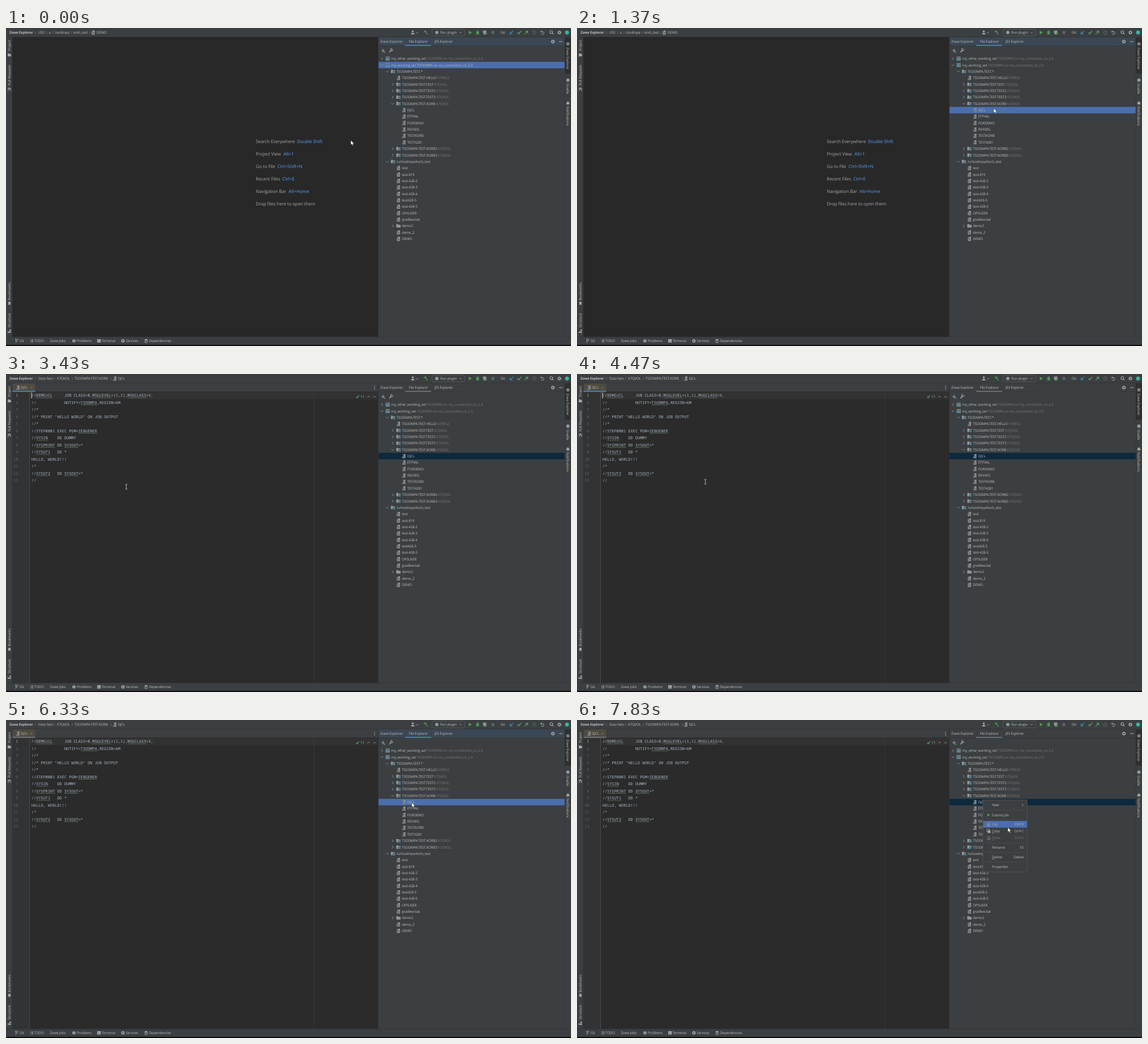
An HTML page for the animation above (8000 ms loop, 998 px wide and 561 px high).

```html
<!DOCTYPE html>
<html lang="en">
<head>
<meta charset="utf-8">
<title>IDE file explorer</title>
<style>
  html, body { margin: 0; width: 100%; height: 100%; overflow: hidden; background: #3c3f41; }
  svg { display: block; width: 998px; height: 561px; }
  text { font: 6.2px "Open Sans", "Noto Sans", sans-serif; letter-spacing: -.16px; fill: #bbb; white-space: pre; text-rendering: geometricPrecision; }
  .bold { font-weight: bold; }
  .big { font-size: 8px; letter-spacing: -.1px; fill: #a5a5a5; }
  .link { fill: #589df6; }
  .dim { fill: #787878; }
  .code { font: 6.9px "Noto Sans Mono", "DejaVu Sans Mono", monospace; letter-spacing: 0; fill: #a9b7c6; }
  .num { fill: #606366; }
  .end { text-anchor: end; }
  .mid { text-anchor: middle; }
</style>
</head>
<body>
<svg id="stage" viewBox="0 0 998 561"></svg>
<script>
const GREY = '#a4a7a9', ICON = '#929597', GREEN = '#499c54', BLUE = '#3a87ad';
const SELECT = '#4b6eaf', FOCUS_LINE = '#4a88c7';
const ROW = 11.357, LINE = 12.5, CHAR = 4.14;

// Drawing helpers; y is the vertical centre of the item.
const text = (x, y, s, cls = '', attrs = '') =>
  `<text x="${x}" y="${y + (cls.includes('big') ? 2.8 : 2.2)}" class="${cls}" ${attrs}>${s}</text>`;
const rect = (x, y, w, h, fill, attrs = '') =>
  `<rect x="${x}" y="${y}" width="${w}" height="${h}" fill="${fill}" ${attrs}/>`;
const path = (x, y, d, stroke = GREY, width = 1, fill = 'none') =>
  `<path transform="translate(${x} ${y})" d="${d}" stroke="${stroke}" stroke-width="${width}" fill="${fill}"/>`;
const solid = (x, y, d, fill = GREY) => path(x, y, d, 'none', 0, fill);
const dot = (x, y, r, fill) => `<circle cx="${x}" cy="${y}" r="${r}" fill="${fill}"/>`;
const ring = (x, y, r, stroke = GREY, width = 1) =>
  `<circle cx="${x}" cy="${y}" r="${r}" fill="none" stroke="${stroke}" stroke-width="${width}"/>`;
const group = (id, body) => `<g id="${id}">${body}</g>`;

const right = (x, y, c = GREY) => path(x, y, 'M-1-2.2L1.2 0L-1 2.2', c, .8);
const down = (x, y, c = GREY) => path(x, y, 'M-2.2-1L0 1.2L2.2-1', c, .8);
const up = (x, y) => path(x, y, 'M-2.2 1L0-1.2L2.2 1', GREY, .8);
const play = (x, y, k = 1) => solid(x, y, `M${-2.5 * k} ${-3.3 * k}L${3 * k} 0L${-2.5 * k} ${3.3 * k}z`, GREEN);
const gear = (x, y) => ring(x, y, 2, GREY, 1.5) +
  `<circle cx="${x}" cy="${y}" r="3.1" fill="none" stroke="${GREY}" stroke-width="1" stroke-dasharray="1.2 1.23"/>`;

const icons = {
  set: (x, y) => rect(x - 3.6, y - 3.4, 7.2, 6.8, '#7d8a92') + rect(x - 3.6, y - 1.7, 7.2, .7, '#3c3f41') +
    rect(x - 2.5, y - .2, 5, 2.4, BLUE),
  folder: (x, y) => solid(x, y, 'M-3.8-3.2H-.8L.3-2H3.8V2.8H-3.8z', ICON),
  source: (x, y) => icons.folder(x, y) + rect(x, y - .2, 4, 3.6, BLUE, 'stroke="#3c3f41" stroke-width=".6"'),
  file: (x, y) => solid(x, y, 'M-.6-3.7H2.8V3.7H-2.8V-1.4H-.6z', ICON) + solid(x, y, 'M-1.3-3.7V-2H-2.8z', ICON) +
    path(x, y, 'M-1.8 0H1.8M-1.8 1.8H1.8', '#45484a', .8),
  member: (x, y) => solid(x, y, 'M-.2-3.7H2.8V3.7H-2.8V1H-1V-1.4H-.2z', ICON) + solid(x, y, 'M-1-3.7V-2H-2.5z', ICON) +
    path(x, y, 'M-3 2.3H1.5M-.3.2H1.8', '#45484a', .8),
};

// [level, chevron, icon, name, suffix]
const tree = [
  [0, '>', 'set', 'my_other_working_set', 'TSODMPA on my_connection_to_2.4'],
  [0, 'v', 'set', 'my_working_set', 'TSODMPA on my_connection_to_2.3'],
  [1, 'v', 'source', 'TSODMPA.TEST.*'],
  [2, '', 'member', 'TSODMPA.TEST.HELLO', 'K7RES2'],
  [2, '>', 'source', 'TSODMPA.TEST.TEST', 'K7QVOL'],
  [2, '>', 'source', 'TSODMPA.TEST.TEST2', 'K7QVOL'],
  [2, '>', 'source', 'TSODMPA.TEST.TEST3', 'K7QVOL'],
  [2, 'v', 'source', 'TSODMPA.TEST.KORB', 'K7QVOL'],
  ...['DJCL', 'ETPVAL', 'FORDEMO', 'REXXEG', 'TESTKORB', 'TEST4281'].map(s => [3, '', 'member', s]),
  [2, '>', 'source', 'TSODMPA.TEST.KORB2', 'K7QVOL'],
  [2, '>', 'source', 'TSODMPA.TEST.KORB3', 'K7QVOL'],
  [1, 'v', 'source', '/u/tsodmpa/korb_test'],
  ...['test', 'test-819', 'test-428-2', 'test-428-3', 'test-428-4', 'test428-5', 'test-428-5', 'OPSUSER', 'gradlew.bat']
    .map(s => [2, '', 'file', s]),
  [2, '>', 'folder', 'demo2'],
  [2, '', 'file', 'demo_2'],
  [2, '', 'file', 'DEMO'],
];
const rowY = i => 54 + i * ROW;
const treeRow = ([level, chevron, icon, name, suffix], i) => {
  const x = 664 + level * 9.5, y = rowY(i);
  const tail = suffix ? `<tspan class="dim" id="suffix${i}"> ${suffix}</tspan>` : '';
  return (chevron === '>' ? right(x, y) : chevron ? down(x, y) : '') +
    icons[icon](x + 10.2, y) + text(x + 16.3, y, name + tail);
};

const code = [
  '//DEMOJCL     JOB CLASS=B,MSGLEVEL=(1,1),MSGCLASS=X,',
  '//            NOTIFY=TSODMPA,REGION=6M',
  '//*',
  '//* PRINT "HELLO WORLD" ON JOB OUTPUT',
  '//*',
  '//STEP0001 EXEC PGM=IEBGENER',
  '//SYSIN    DD DUMMY',
  '//SYSPRINT DD SYSOUT=*',
  '//SYSUT1   DD *',
  'HELLO, WORLD!!!',
  '/*',
  '//SYSUT2   DD SYSOUT=*',
  '//',
];
const codeLine = (s, i) => {
  const y = 38 + i * LINE;
  const typos = [...s.matchAll(/DEMOJCL|MSG\w+|TSODMPA|IEBGENER|SYS\w+/g)]
    .map(m => rect(45 + m.index * CHAR, y + 3.6, m[0].length * CHAR, .7, '#64836a')).join('');
  return text(21.5, y, i + 1, 'code num end', i ? '' : 'style="fill:#a4a3a3"') + text(45, y, s, 'code') + typos;
};

const crumbs = (items, seps) => items.map(([x, s]) => text(x, 8, s)).join('') +
  seps.map(x => right(x, 8, '#777')).join('');

const topBar = () => text(6, 8, 'Zowe Explorer', 'bold') + right(52, 8, '#777') +
  dot(718.5, 6, 1.8, GREY) + solid(718.5, 8, 'M-3.2 3.2Q-3 .6 0 .6T3.2 3.2z') + down(726, 8.2) +
  path(741, 8, 'M-3-1L1-3.5M-.5-2L3.5 3.2', GREEN, 1.5) +
  rect(752.5, 2, 57.5, 12, 'none', 'rx="1.5" stroke="#5e6060" stroke-width=".8"') + dot(761, 8, 3, '#8a9a9c') +
  text(767, 8, 'Run plugin') + down(803, 8) + play(820, 8) +
  `<ellipse cx="833" cy="8.4" rx="2.3" ry="3" fill="${GREEN}"/>` +
  path(833, 8, 'M-3.5-2L3.5 3M3.5-2L-3.5 3M-1.5-4L1.5-2M1.5-4L-1.5-2', GREEN, .7) +
  solid(845.5, 7.5, 'M-3-3H3V1Q2 3.5 0 4Q-3 3-3 0z', ICON) + play(848, 9.8, .75) +
  rect(857.4, 5.4, 5.2, 5.2, '#5f6264') + text(873.5, 8, 'Git:') +
  path(893, 8, 'M2.8-2.8L-2 2M-2.5-1.5V2.5H1.5', '#3592c4', 1.2) +
  path(906.5, 8, 'M-3 0L-1 2.5L3.2-2.7', '#59a869', 1.4) +
  path(919, 8, 'M-2.8 2.8L2 -2M-1.5-2.5H2.5V1.5', '#59a869', 1.2) +
  ring(933, 8, 3.2, '#5f6264') + path(933, 8, 'M0-2V.3H1.8', '#5f6264', .8) +
  path(947, 8, 'M-2.5-1.5H1A2.2 2.2 0 0 1 1 3H-1.5M-.8-3.6L-3-1.5L-.8.6', GREY, 1) +
  ring(963.2, 7.2, 2.4, GREY, 1.1) + path(963.2, 7.2, 'M1.8 1.8L4 4', GREY, 1.2) +
  gear(977.5, 8) + dot(991, 8, 3.4, '#35b8a0');

const bottomBar = () => [[24, 'Git'], [50, 'TODO'], [77.5, 'Zowe Jobs'], [125, 'Problems'], [169, 'Terminal'],
    [211.5, 'Services'], [252.5, 'Dependencies']].map(([x, s]) => text(x, 552, s)).join('') +
  path(19, 552, 'M-1.5-3.5V3.5M-1.5 1Q1.5 1 1.5-1.8', GREY, .9) + dot(17.5, 549, 1, GREY) + dot(20.5, 549.6, 1, GREY) +
  path(45.5, 552, 'M-2.5-2H-1.5M-.7-2H2.8M-2.5 0H-1.5M-.7 0H2.8M-2.5 2H-1.5M-.7 2H2.8', GREY, 1) +
  dot(120, 552, 2.8, GREY) + path(120, 552, 'M0-1.8V.4M0 1.1V1.9', '#3c3f41', .9) +
  rect(161, 549, 6.4, 6, GREY) + path(164, 552, 'M-1.8-1.5L-.3 0L-1.8 1.5M.4 1.6H2.4', '#3c3f41', .7) +
  dot(206.5, 552, 3, GREY) + solid(206.5, 552, 'M-1-1.7L1.8 0L-1 1.7z', '#3c3f41') +
  solid(247.5, 552, 'M0-3.5L3.5-1.8L0 0L-3.5-1.8z') + path(247.5, 552, 'M-3.2.3L0 1.8L3.2.3M-3.2 2L0 3.4L3.2 2', GREY, .8);

const vertical = (x, y, s, angle) => `<g transform="translate(${x} ${y}) rotate(${angle})">${text(0, 0, s)}</g>`;
const stripes = () => [[40.5, 'Project'], [101.5, 'Pull Requests'], [480.5, 'Bookmarks'], [528.5, 'Structure']]
    .map(([y, s]) => vertical(6, y, s, -90)).join('') +
  solid(6, 47.3, 'M-2.8-2.6H-.3L.6-1.6H2.8V2.6H-2.8z') +
  path(6, 108, 'M-2-3V3M2-1V3M2-1.5H-.5M.8-3L-.6-1.5L.8 0', GREY, 1.1) +
  solid(6, 486, 'M-2-3H2V3L0 1.4L-2 3z') +
  rect(3, 535.2, 2.6, 2.6, GREY) + rect(6, 532, 2.6, 2.6, GREY) + rect(6, 535.4, 2.6, 2.6, GREY) +
  rect(987, 16.5, 11, 64, '#2d2f30') + dot(992.5, 28, 3, '#7b7e80') + vertical(992.3, 34, 'Zowe Explorer', 90) +
  dot(992.5, 92, 3, '#8a9a9c') + vertical(992.3, 98, 'Gradle', 90) +
  solid(992.5, 132.5, 'M-3 2V1L-2-1Q-1.6-3 0-3T2-1L3 1V2zM-1 2.5H1L0 3.6z') +
  vertical(992.3, 138, 'Notifications', 90);

const panel = () => rect(657.2, 16, .8, 529, '#2f3133') + rect(658, 16.5, 329, 14.5, '#3b4754', 'id="header"') +
  rect(658, 31, 329, .7, '#323537') + rect(705, 29.8, 46, 1.7, FOCUS_LINE, 'id="headerLine"') +
  text(661, 24, 'Zowe Explorer:') + text(711.5, 24, 'File Explorer') + text(757, 24, 'JES Explorer') +
  gear(966, 24) + path(980, 24, 'M-3 0H3', GREY, 1.1) +
  path(666, 40, 'M-3 0H3M0-3V3', GREY, 1.1) + solid(669, 43.2, 'M-1.4-1H1.4L0 .8z') +
  path(680, 40, 'M-3 3L1-1', GREY, 1.5) + path(681.3, 38.3, 'M.8-2A2 2 0 1 0 2-.8', GREY, 1.2) +
  rect(658, 0, 329, ROW, SELECT, 'id="selection"') + tree.map(treeRow).join('');

const welcome = () => crumbs([[57, 'USS'], [75.5, 'u'], [87, 'tsodmpa'], [119, 'korb_test'], [160, 'DEMO']], [71.5, 83, 115, 147.5]) +
  icons.file(154, 8) + rect(11, 16, 646.2, 529, '#282828') +
  [['Search Everywhere', 514, 'Double Shift'], ['Project View', 490, 'Alt+1'], ['Go to File', 479.5, 'Ctrl+Shift+N'],
    ['Recent Files', 488, 'Ctrl+E'], ['Navigation Bar', 499, 'Alt+Home'], ['Drop files here to open them', 0, '']]
    .map(([s, x, key], i) => text(441.3, 200 + i * 22.1, s, 'big') + text(x, 200 + i * 22.1, key, 'big link')).join('');

const spoke = (_, i) => `<path d="M334 278V274.8" transform="rotate(${i * 45} 334 282)" stroke="#686868" stroke-linecap="round"/>`;
const editor = () => crumbs([[57, 'Data Sets'], [90, 'K7QVOL'], [121, 'TSODMPA.TEST.KORB'], [197.5, 'DJCL']], [85.5, 117, 185.5]) +
  icons.member(192, 8) + rect(11, 31, 646.2, 514, '#2b2b2b') + rect(11, 31, 30.5, 514, '#313335') +
  rect(11.5, 16.5, 40, 14.5, '#4f4b41') + rect(11.5, 29.7, 40, 1.8, FOCUS_LINE, 'id="tabLine"') +
  icons.member(21, 24) + text(26, 24, 'DJCL') + path(45, 24, 'M-1.5-1.5L1.5 1.5M1.5-1.5L-1.5 1.5', '#808385', .7) +
  [-2.5, 0, 2.5].map(d => dot(651, 24 + d, .8, GREY)).join('') +
  rect(11, 32, 646.2, LINE, '#323232') + rect(41.3, 31.5, .8, 513.5, '#555') + rect(543.6, 31.5, .8, 513.5, '#3c3c3c') +
  code.map(codeLine).join('') + rect(44.6, 32.5, 1.1, 10.5, '#ccc', 'id="caret"') +
  group('inspection', path(621, 40, 'M-2.3 0L-.5 2L2.5-2.5', '#59a869', 1.3) + text(626, 40, '11') + up(640.5, 40) + down(651, 40)) +
  group('loading', group('spinner', Array.from({ length: 8 }, spoke).join('')) +
    text(334, 299.5, 'Loading...', 'mid', 'style="fill:#808080"'));

const letter = s => `<tspan text-decoration="underline">${s}</tspan>`;
const menu = () => rect(717, 141, 78, 127, '#3c3f41', 'stroke="#555859" stroke-width=".8"') +
  rect(717.3, 0, 77.4, 12, SELECT, 'id="hover"') +
  [[150, 'New', ''], [167.5, 'Submit Job', ''], [184, `Cu${letter('t')}`, 'Ctrl+X'], [196, `${letter('C')}opy`, 'Ctrl+C'],
    [208, `${letter('P')}aste`, 'Ctrl+V'], [225, 'Rename', 'F2'], [242, `${letter('D')}elete`, 'Delete'], [259, 'Properties', '']]
    .map(([y, s, key]) => {
      const dim = y === 208 ? 'dim' : '';
      return text(733, y, s, dim) + text(789, y, key, `end ${dim}`);
    }).join('') +
  [158.7, 175.7, 216.5, 233.5, 250.5].map(y => rect(722, y, 68, .6, '#515151')).join('') +
  right(787, 150) + play(727, 167.5, .85) +
  path(727, 184, 'M-2.5-3L1.7 2M2.5-3L-1.7 2', GREY, .9) + ring(725, 186.5, 1, GREY, .8) + ring(729, 186.5, 1, GREY, .8) +
  rect(724, 192.8, 4.4, 4.4, 'none', `stroke="${GREY}" stroke-width=".8"`) + rect(725.6, 194.6, 4.6, 4.8, GREY) +
  rect(724.2, 205, 4.6, 6, 'none', 'stroke="#666" stroke-width=".9"') + rect(726, 207.5, 4.2, 4, '#666');

const stage = document.getElementById('stage');
stage.innerHTML = rect(0, 0, 998, 561, '#3c3f41') + topBar() + group('welcome', welcome()) + group('editor', editor()) +
  panel() + stripes() + rect(0, 15.3, 998, .8, '#323537') + rect(0, 544.6, 998, .8, '#323537') +
  rect(10.6, 16, .7, 529, '#323537') + rect(986.7, 16, .6, 529, '#323537') + bottomBar() + rect(0, 559, 998, 2, '#0c0c0c') +
  group('menu', menu()) +
  group('arrow', path(0, 0, 'M0 0V8.3L1.9 6.6L3.3 9.6L4.7 9L3.4 6.1H5.8z', '#1a1a1a', .5, '#fff')) +
  group('beam', path(0, 0, 'M-1.8-4.2H-.5L0-3.7L.5-4.2H1.8M0-3.7V3.7M-1.8 4.2H-.5L0 3.7L.5 4.2H1.8', '#ddd', .8));

const el = {};
stage.querySelectorAll('[id]').forEach(node => el[node.id] = node);
const show = (id, on) => el[id].style.display = on ? '' : 'none';

// Pointer stops: [time, x, y]
const stops = [
  [270, 609, 198], [970, 736, 141.5], [3100, 736, 141.5], [3430, 212.5, 199], [3600, 214, 191], [4400, 214, 191],
  [5130, 694, 156.5], [5230, 697, 154], [5600, 716.7, 145.5], [7300, 716.7, 145.5], [7830, 761, 189.5],
];
function pointer(t) {
  const i = stops.findIndex(s => s[0] > t);
  if (i === 0) return stops[0].slice(1);
  if (i < 0) return stops.at(-1).slice(1);
  const [t0, x0, y0] = stops[i - 1], [t1, x1, y1] = stops[i];
  const p = (t - t0) / (t1 - t0), e = p * p * (3 - 2 * p);
  return [x0 + (x1 - x0) * e, y0 + (y1 - y0) * e];
}

const PICK = 1370, OPEN = 1600, REFOCUS = 6100, MENU = 6930;

function draw(t) {
  const opened = t >= OPEN, menuOpen = t >= MENU;
  const treeFocus = !opened || (t >= REFOCUS && !menuOpen);
  const editorFocus = opened && t < REFOCUS;
  show('welcome', !opened);
  show('editor', opened);

  el.header.setAttribute('fill', treeFocus ? '#3b4754' : '#3c3f41');
  el.headerLine.setAttribute('fill', treeFocus ? FOCUS_LINE : '#747a80');
  el.tabLine.setAttribute('fill', editorFocus ? FOCUS_LINE : '#747a80');
  el.selection.setAttribute('y', rowY(t < PICK ? 1 : 8) - ROW / 2);
  el.selection.setAttribute('fill', treeFocus ? SELECT : '#0d293e');
  el.suffix1.style.fill = t < PICK ? '#bbb' : '';

  show('caret', editorFocus && (t < 2830 || Math.floor((t - 3400) / 500) % 2 === 0));
  show('inspection', t >= 2630);
  el.loading.style.opacity = Math.max(0, Math.min(1, (2400 - t) / 200));
  const step = Math.floor(t / 125);
  [...el.spinner.children].forEach((node, i) => node.style.opacity = 1 - ((step - i + 80) % 8) * .08);

  const [x, y] = pointer(t);
  const beam = opened && x > 42 && x < 657;
  show('beam', beam);
  show('arrow', !beam);
  el[beam ? 'beam' : 'arrow'].setAttribute('transform', `translate(${x} ${y})`);

  show('menu', menuOpen);
  const hovered = [150, 167.5, 184].find(c => Math.abs(y - c) <= 6);
  show('hover', t > 7300 && hovered);
  if (hovered) el.hover.setAttribute('y', hovered - 6);
}

const start = performance.now();
function tick() {
  draw((performance.now() - start) % 8000);
  requestAnimationFrame(tick);
}
tick();
</script>
</body>
</html>
```
